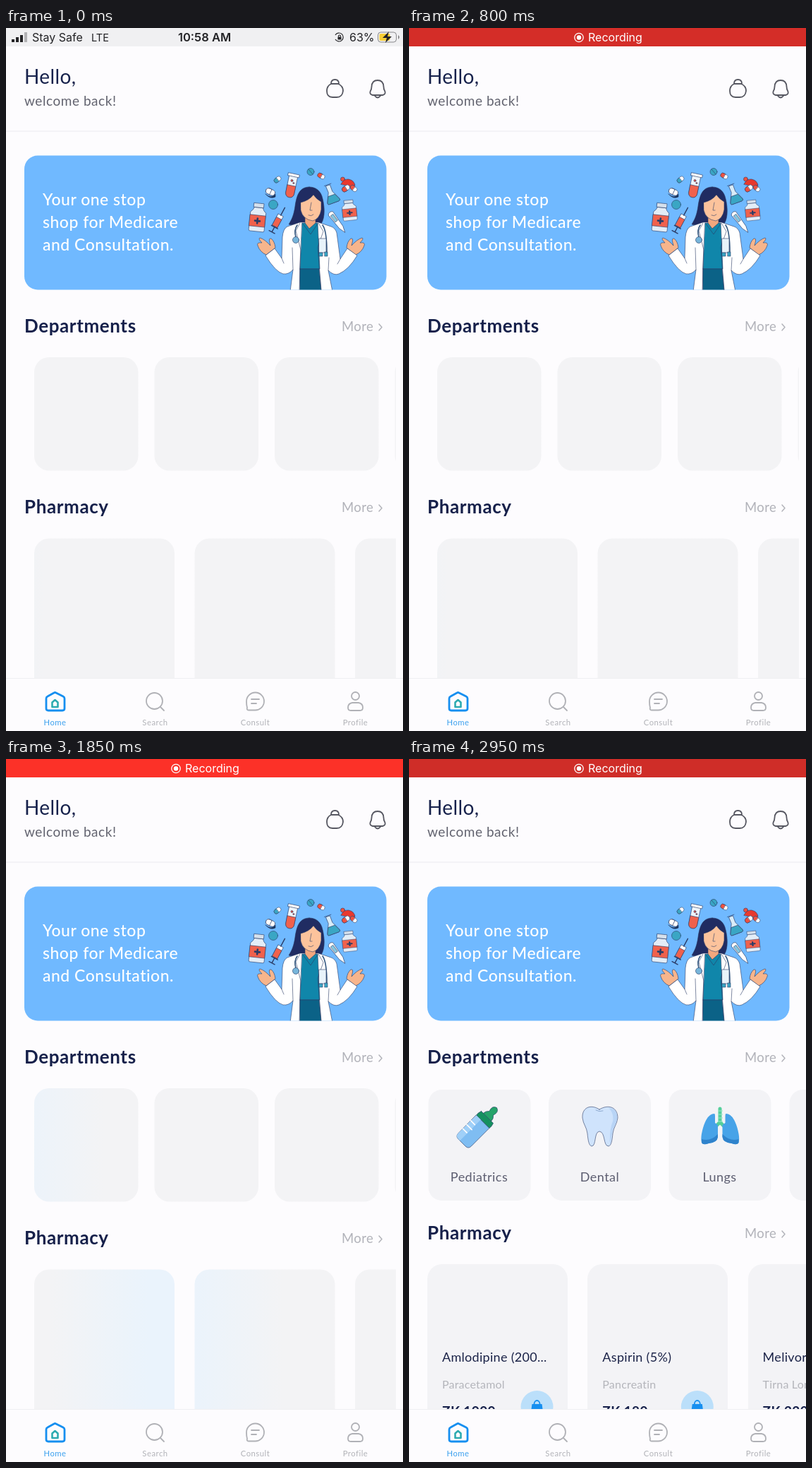
Write an HTML page that moves like this. It is 563 px wide and 995 px high and loops after 3 s.

```html
<!DOCTYPE html>
<html lang="en">
<head>
<meta charset="utf-8">
<title>Medicare home</title>
<style>
html, body { margin: 0; width: 100%; height: 100%; overflow: hidden; background: #fdfcfe; }
svg { display: block; }
text { font-family: Lato, sans-serif; letter-spacing: .4px; }
#status text { font-family: Inter, sans-serif; font-size: 16px; letter-spacing: 0; }
.title { font-size: 26px; font-weight: 700; fill: #16204a; letter-spacing: .6px; }
.more { font-size: 18.5px; fill: #b2b3ba; }
.banner { font-size: 23px; font-weight: 500; fill: #fff; letter-spacing: .5px; }
.dept { font-size: 18px; fill: #5c5d70; text-anchor: middle; letter-spacing: .45px; }
.drug { font-size: 18px; fill: #1b2348; letter-spacing: .3px; }
.maker { font-size: 16px; fill: #b4b5bb; letter-spacing: .2px; }
.price { font-size: 19px; font-weight: 700; fill: #16204a; }
.nav text { font-size: 11.3px; text-anchor: middle; fill: #b2b3b8; letter-spacing: .5px; }
.line { fill: none; stroke-width: 1.8; stroke-linecap: round; stroke-linejoin: round; }
.art { stroke: #2b3c66; stroke-width: .6; stroke-linejoin: round; stroke-linecap: round; }
</style>
</head>
<body>
<svg width="563" height="995" viewBox="0 0 563 995">
<defs>
  <linearGradient id="deptGlow" gradientUnits="userSpaceOnUse" x1="-165" x2="165" y1="0" y2="0">
    <stop stop-color="#f3f3f5"/><stop offset=".42" stop-color="#eaf3fc"/>
    <stop offset=".58" stop-color="#eaf3fc"/><stop offset="1" stop-color="#f3f3f5"/>
  </linearGradient>
  <linearGradient id="drugGlow" href="#deptGlow"/>
  <clipPath id="list"><path d="M0 400H553V920H0Z"/></clipPath>
  <clipPath id="bannerClip"><rect x="26" y="180.500" width="513.500" height="190" rx="19"/></clipPath>
  <g id="more"><text class="more" x="476">More</text><path class="line" stroke="#b2b3ba" style="stroke-width:1.500px" d="M529-10l4 4.500-4 4.500"/></g>
  <g id="buy"><circle r="23" fill="#bbdffa"/><path d="M-7-4h14l2 14H-9Z" fill="#168ff0"/><path class="line" stroke="#168ff0" d="M-4-4a4 5 0 0 1 8 0"/></g>
  <g id="pill"><rect x="-6" y="-3.500" width="12" height="7" rx="3.500" fill="#fff"/><path d="M0-3.500h-2.500a3.500 3.500 0 0 0 0 7H0Z"/></g>
  <g id="jar"><path d="M-6-14H6Q7-10 11-7V18Q11 20 9 20H-9Q-11 20-11 18V-7Q-7-10-6-14Z" fill="#e3edf7"/><path d="M-7-20H7v6H-7Z" fill="#d5e0ec"/><path d="M-11-3H11V13H-11Z" fill="#f0614c"/><path d="M0 1.500V8.500M-3.500 5H3.500" stroke-width="2.600"/></g>
</defs>

<!-- header -->
<path d="M0 146H563" stroke="#f2f1f4" stroke-width="1.500"/>
<text x="26" y="79" font-size="28" fill="#17224c">Hello,</text>
<text x="26" y="110" font-size="19" fill="#62636f" style="letter-spacing:.55px">welcome back!</text>
<g class="line" stroke="#565761">
  <path d="M461 79H471Q478 82 478 89Q477 98 469 98H463Q455 98 455 89Q455 82 461 79ZM461 79Q461 73 466.500 73Q472 73 472 79"/>
  <path d="M527 74Q519 74 518.500 83Q518.500 87 516.500 90Q515.500 94 520 95H534Q538.500 94 537.500 90Q535.500 87 535.500 83Q535 74 527 74ZM523 96Q527 101 531 96"/>
</g>

<!-- banner -->
<g clip-path="url(#bannerClip)">
  <path d="M25 180H541V372H25Z" fill="#70b9ff"/>
  <text class="banner" x="52" y="251">Your one stop</text>
  <text class="banner" x="52" y="283">shop for Medicare</text>
  <text class="banner" x="52" y="315">and Consultation.</text>
  <g class="art">
    <use href="#pill" transform="translate(385 214.500)rotate(-40)scale(.900)" fill="#3aa6c4"/>
    <use href="#pill" transform="translate(447 209.500)rotate(30)scale(.900)" fill="#ef513f"/>
    <use href="#pill" transform="translate(375 232)rotate(25)scale(1.150)" fill="#fff"/>
    <path d="M368 235Q376 242 382 235V239Q375 243 368 235Z" fill="#17365f"/>
    <circle cx="432" cy="203.500" r="5" fill="#3aa6c4"/><path d="M429 200l6 7"/>
    <circle cx="379" cy="250" r="6.500" fill="#3aa6c4"/>
    <circle cx="477.500" cy="214" r="3" fill="#ef513f"/>
    <path d="M475 221Q479 213 486 214Q494 216 495 223L487 224Z" fill="#e8392e"/>
    <use href="#pill" transform="translate(482 227)rotate(-35)" fill="#ef513f"/>
    <use href="#pill" transform="translate(493 227)rotate(40)scale(.900)" fill="#ef513f"/>
    <g transform="translate(405 223)rotate(12)">
      <path d="M-6-14H6V12Q5 17 0 17T-6 12Z" fill="#eef5fb"/><path d="M-6 0H6V12Q5 17 0 17T-6 12Z" fill="#f0614c"/>
      <path d="M-8-17H8v4H-8Z" fill="#fff"/><circle cx="-1" cy="-7" r="1.500" fill="#ef513f"/><circle cx="2" cy="-4" r="1" fill="#ef513f"/>
    </g>
    <g transform="translate(461 235)rotate(-20)">
      <path d="M-3-13H3V-3L9 10Q10 13 7 13H-7Q-10 13-9 10L-3-3Z" fill="#d9ecf8"/><path d="M-5 2H5L9 10Q10 13 7 13H-7Q-10 13-9 10Z" fill="#3aa6c4"/>
      <path d="M-5-14H5"/>
    </g>
    <use href="#jar" transform="translate(357 268)rotate(6)"/>
    <use href="#jar" transform="translate(487 258)rotate(-6)scale(.900 .720)"/>
    <g transform="translate(386 272)rotate(28)">
      <path d="M-4-8H4V10H-4Z" fill="#fff"/><path d="M-4-3H4V10H-4Z" fill="#f0614c"/><path d="M0-8V-20M-5 11H5M0 11V18M-4.500 19H4.500" stroke-width="1.400"/>
    </g>
    <g transform="translate(470 275)rotate(-37)">
      <path d="M-4-16Q0-20 4-16L3 9 0 18-3 9Z" fill="#fff"/><path d="M-2-13H2V-2H-2Z" fill="#85c7df"/>
    </g>

    <!-- doctor -->
    <path d="M430 225C415 225 412 239 410 252C408 266 405 271 401 278Q424 284 447 277C453 268 452 251 448 238C445 229 438 225 430 225Z" fill="#202c62"/>
    <path id="hand" d="M369 321L382 311Q381 302 376 298Q372 297 374 304L375 308Q367 299 360 297Q357 298 363 304Q355 303 357 308Q360 317 369 321Z" fill="#f7b58c"/>
    <use href="#hand" transform="matrix(-1 0 0 1 865 0)"/>
    <path d="M417 275L399 281Q393 284 392 296L391 326L381 312L368 322Q382 345 393 348Q401 349 407 342L403 373H463L457 343Q465 351 472 348Q486 342 498 322L484 312L474 327L469 290Q467 283 461 281L443 275Z" fill="#fff"/>
    <path d="M391 326L394 333M474 327L470 334M407 342L406 311M457 343L458 325" fill="none"/>
    <path d="M420 276H442L445 341H417Z" fill="#1086aa"/>
    <path d="M417 341H444L447 373H417Z" fill="#0b6287"/>
    <path d="M424 264V276L430 284 439 276V264Z" fill="#f2a77e"/>
    <path d="M418 247Q430 244 436 236Q440 242 447 246V257Q445 270 435 273Q421 271 418 258Z" fill="#fcc39c"/>
    <path d="M433 247L431 258H434M429 265Q433 267 436 264M421 277L432 292 442 277" fill="none"/>
    <path d="M417 276L411 287 418 314 416 371M443 276L450 288 442 310 447 371" fill="none"/>
    <path d="M413 279Q408 286 411 296M449 279Q455 287 455 318" fill="none" stroke="#31557e" stroke-width="1.600"/>
    <circle cx="411" cy="300" r="4.500" fill="#77b5da"/>
    <path d="M444 298H454V318H444Z" fill="#e8f3fa"/><path d="M444 318h5v5h-5zM452 317h4v6h-4z" fill="#3aa6c4"/>
  </g>
</g>

<!-- departments -->
<text class="title" x="26" y="431">Departments</text>
<use href="#more" y="429"/>

<!-- loading -->
<g id="loading">
  <text class="title" x="26" y="687">Pharmacy</text>
  <use href="#more" y="685"/>
  <g clip-path="url(#list)">
    <g id="deptGhosts" fill="url(#deptGlow)"></g>
    <g id="drugGhosts" fill="url(#drugGlow)"></g>
  </g>
</g>

<!-- loaded -->
<g id="loaded">
  <text class="title" x="26" y="680">Pharmacy</text>
  <use href="#more" y="678"/>
  <g id="cards" fill="#f3f3f6"></g>
  <g class="art" transform="translate(99 519)rotate(45)">
    <path d="M-8-17Q-8-22-4-25Q-7-34 0-36Q7-34 4-25Q8-22 8-17Z" fill="#25a36a"/>
    <path d="M-12-17H12Q14-12 13-8H-13Q-14-12-12-17Z" fill="#159060"/>
    <path d="M-13-8H13V28Q13 34 7 34H-7Q-13 34-13 28Z" fill="#7fbdf2"/>
    <path d="M-13-8H-4V34H-7Q-13 34-13 28Z" fill="#a0d0f8" stroke="none"/>
    <path d="M-13 3H-5M-13 11H-3M-13 19H-5" stroke="#fff" stroke-width="1.600"/>
  </g>
  <path class="art" d="M270 496C258 488 245 493 246 508C247 517 252 521 253 530C254 540 255 547 259 548C266 548 262 528 270 527C279 528 275 548 283 548C287 547 288 540 289 530C290 521 295 517 296 508C296 493 283 488 270 496Z" fill="#cfe3fc"/>
  <path d="M283 494Q296 495 295 508Q294 517 289 524L285 546Q284 524 289 513Q291 501 283 494Z" fill="#b8d4f6"/>
  <path d="M265 497Q270 500 275 498" class="line" stroke="#8fabd1" style="stroke-width:1px"/>
  <path class="line" d="M441 495V514L435 520M441 514L447 520" stroke="#54cf9b" style="stroke-width:5px"/>
  <path d="M438 498h7m-7 5h7m-7 5h7m-7 5h7" stroke="#9de9c8"/>
  <g id="lung">
    <path d="M433 502Q423 502 417 522Q413 536 415 543Q417 547 425 544Q437 543 438 535V518L434 515V505Q434 502 433 502Z" fill="#47a3e8"/>
    <path d="M415 538Q427 542 438 531V535Q437 543 425 544Q417 547 415 543Z" fill="#2f83cc"/>
  </g>
  <use href="#lung" transform="matrix(-1 0 0 1 882.500 0)"/>
  <text class="dept" x="99.500" y="598">Pediatrics</text>
  <text class="dept" x="270.500" y="598">Dental</text>
  <text class="dept" x="440.500" y="598">Lungs</text>
  <g id="drugs"></g>
</g>

<!-- bottom navigation -->
<path d="M0 920H563V995H0Z" fill="#fdfcfe"/>
<path d="M0 920.500H563" stroke="#efeff2"/>
<g class="line" stroke="#b0b1b6">
  <path d="M57 949Q57 947 59 946L68 941Q69.500 940 71 941L81 946Q83 947 83 949V963Q83 966 80 966H60Q57 966 57 963Z" stroke="#168ff0" style="stroke-width:2.800px"/>
  <path d="M65.500 954.500L69.500 951 73.500 954.500V961H65.500Z" stroke="#2cabb0" style="stroke-width:2.600px"/>
  <circle cx="210.500" cy="952.500" r="11.500"/><path d="M219 961L224 966"/>
  <path d="M341 953A12.500 12.500 0 1 1 353 965.500H344Q341 965.500 342 962Q341 959 341 953ZM348 950H359M348 956H355"/>
  <circle cx="495.500" cy="945.500" r="5.500"/><path d="M491 955H500Q506 956 506 962Q506 966 502 966H489Q485 966 485 962Q485 956 491 955Z"/>
</g>
<g class="nav">
  <text x="69.500" y="987" style="fill:#3aa0ee">Home</text><text x="211.500" y="987">Search</text>
  <text x="353.500" y="987">Consult</text><text x="495.500" y="987">Profile</text>
</g>

<!-- status bar -->
<g id="status">
  <path id="bar" d="M0 0H563V26H0Z"/>
  <g id="phone">
    <path d="M8 16h4v4H8zM14 13h4v7h-4zM20 10h4v10h-4z"/><path d="M26 6h4v14h-4z" opacity=".3"/>
    <text x="37" y="19">Stay Safe</text><text x="121" y="19" style="font-size:14.500px">LTE</text>
    <text id="clock" y="19" style="font-weight:600;font-size:16.500px">10:58 AM</text>
    <g fill="none" stroke="currentColor" stroke-width="1.200"><path d="M467 10A6 6 0 1 1 467 16"/><path d="M471.500 12.500V11.500a1.500 1.500 0 0 1 3 0V12.500"/></g>
    <path d="M470.500 12.500h5v4h-5z"/>
    <text x="487" y="19">63%</text>
    <rect x="527.500" y="6" width="26" height="14" rx="4" fill="none" stroke="currentColor" opacity=".5"/>
    <path d="M556 10q4 3 0 6Z" opacity=".5"/>
    <rect x="529.500" y="8" width="15" height="10" rx="2" fill="#f8ce35"/>
    <path d="M543 5L534 14H540L538 21 547 12H541Z"/>
  </g>
  <g id="dot"><circle cx="241" cy="13.500" r="6.200" fill="none" stroke="#fff" stroke-width="1.300"/><circle cx="241" cy="13.500" r="3.200" fill="#fff"/></g>
  <text id="recording" x="254" y="19" fill="#fff">Recording</text>
</g>
</svg>
<script>
const $ = id => document.getElementById(id);
const show = (id, on) => $(id).setAttribute('visibility', on ? 'visible' : 'hidden');
const rects = (xs, y, w, h, r) =>
  xs.map(x => `<rect x="${x}" y="${y}" width="${w}" height="${h}" rx="${r}"/>`).join('');

$('deptGhosts').innerHTML = rects([40, 210.5, 381, 551.5], 466, 147.5, 160.5, 21);
$('drugGhosts').innerHTML = rects([40, 267.5, 495], 722.5, 199, 260, 21);
$('cards').innerHTML = rects([27.5, 198, 368.5, 539.5], 468, 145, 157, 19) +
  rects([26, 253, 481], 715, 199, 260, 21);
$('drugs').innerHTML = [
  ['Amlodipine (200...', 'Paracetamol', 'ZK 1000'],
  ['Aspirin (5%)', 'Pancreatin', 'ZK 180'],
  ['Melivor', 'Tirna Loma', 'ZK 220']
].map(([drug, maker, price], i) => `<g transform="translate(${i * 227.3} 0)">
  <text class="drug" x="47" y="853">${drug}</text>
  <text class="maker" x="47" y="891">${maker}</text>
  <text class="price" x="47" y="929.5">${price}</text>
  <use href="#buy" x="181.500" y="917"/></g>`).join('');

const LOOP = 3000, STEP = 50, SWEEP = 800, SPEED = 1.35, SPAN = SWEEP * SPEED;
const wrap = x => ((x + 200) % SPAN + SPAN) % SPAN - 200;
const mix = (a, b, k) => `rgb(${a.map((v, i) => Math.round(v + (b[i] - v) * k))})`;

function draw(now) {
  const t = Math.floor(now % LOOP / STEP) * STEP;

  const x = 310 + (t - 500) * SPEED;
  $('deptGlow').setAttribute('gradientTransform', `translate(${wrap(x)} 0)`);
  $('drugGlow').setAttribute('gradientTransform', `translate(${wrap(x + 255)} 0)`);
  show('loading', t < 2800);
  show('loaded', t >= 2800);

  // The bar turns red, then pulses every two seconds.
  const red = Math.min(1, Math.max(0, (t - 100) / 200));
  const pulse = Math.cos(t / 1000 * Math.PI);
  $('bar').setAttribute('fill', mix([240, 240, 242], [231 + 24 * pulse, 47 + 2 * pulse, 40], red));
  const ink = mix([35, 35, 38], [255, 240, 240], red);
  $('phone').setAttribute('fill', ink);
  $('phone').style.color = ink;
  $('clock').setAttribute('x', t < 200 ? 244 : 254.5);
  show('phone', t < 800);
  show('dot', t >= 200);
  show('recording', t >= 800);
  requestAnimationFrame(draw);
}
requestAnimationFrame(draw);
</script>
</body>
</html>
```
